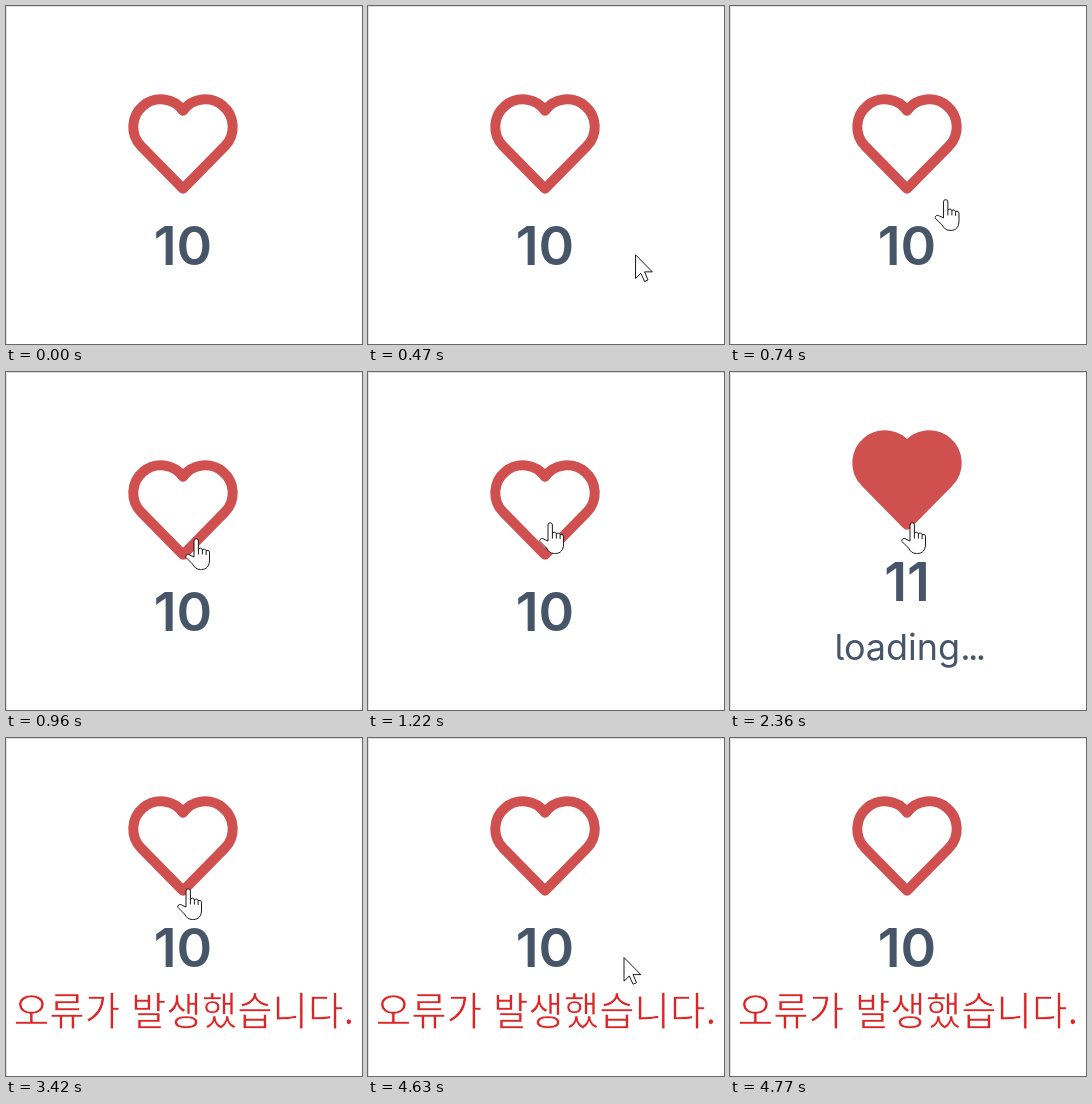
An HTML page for the animation above (6.03 s loop, 356 by 338 pixels).

```html
<!DOCTYPE html>
<html lang="ko">
<head>
<meta charset="utf-8">
<title>Like button</title>
<style>
  html, body { margin: 0; width: 100%; height: 100%; overflow: hidden; background: #fff; }
  svg { display: block; width: 100vw; height: 100vh; }
  text { fill: #475569; font-family: Inter, sans-serif; font-optical-sizing: none; }
  #count { font-size: 54px; font-weight: 600; text-anchor: middle; }
  #loading { font-size: 36px; font-feature-settings: "cv05"; }
  #loading tspan { letter-spacing: -.07em; }
  #error {
    font: 38.5px "Noto Sans CJK KR", "Noto Sans CJK", sans-serif;
    text-anchor: middle; fill: #dc2626; stroke: #fff; stroke-width: .7;
  }
  #heart { stroke: #d04f4f; stroke-width: 10; stroke-linejoin: round; }
  .cursor { fill: #fff; stroke: #000; stroke-width: .9; stroke-linejoin: round; }
  #click { fill: #ffff80; mix-blend-mode: multiply; }
</style>
</head>
<body>
<svg viewBox="0 0 356 338">
  <path d="M.5 338V.5H356" fill="none" stroke="#e0e0e0"/>
  <g id="like">
    <path id="heart" d="M177 182.8L135 140A27.5 27.5 0 1 1 177 104.7A27.5 27.5 0 1 1 219 140Z"/>
    <text id="count" x="177" y="259">10</text>
  </g>
  <text id="loading" x="104.5" y="288">loading<tspan>...</tspan></text>
  <text id="error" x="178" y="287">오류가 발생했습니다.</text>
  <g id="pointer">
    <path id="arrow" class="cursor" d="M.5.5V24.2L5.8 19 9.6 27.2 13 25.7 9.5 17.6H17.3Z"/>
    <g id="hand" class="cursor" transform="translate(-10)">
      <path d="M9 19V3a2.2 2.2 0 0 1 4.4 0V11q2.4-2 4 .5 2.6-1.5 3.7 1 3-1 3.4 1.7V22c0 6-3 9.5-8 9.5h-1c-4 0-6-2-8-5.5L1 19.5C0 17 3 15.5 5 17.2Z"/>
      <path d="M13.4 11v5.5M17.4 11.5v5M21.1 12.5v4.5" fill="none"/>
    </g>
  </g>
  <circle id="click" cx="181" cy="149.5" r="18"/>
</svg>
<script>
  const LOOP = 6030;
  const entry = [318, 302], edge = [189, 166], rest = [181, 150], exit = [330, 288];
  const el = id => document.getElementById(id);
  const show = (id, on) => el(id).setAttribute('display', on ? 'inline' : 'none');
  const move = (id, x, y) => el(id).setAttribute('transform', `translate(${x} ${y})`);

  // Eased travel between two points, sampled once per step
  function glide(t, start, end, step, from, to, power) {
    const u = Math.min(1, Math.floor((t - start) / step) * step / (end - start));
    return to.map((v, i) => v + (from[i] - v) * (1 - u) ** power);
  }

  function pointerAt(t) {
    if (t < 960) return glide(t, 330, 960, 70, entry, edge, 2);
    if (t < 4560) return glide(t, 960, 1220, 65, edge, rest, 1);
    return glide(t, 4560, 4700, 70, rest, exit, 1);
  }

  function draw() {
    const t = performance.now() % LOOP;
    const clicked = t >= 2360, failed = t >= 3420, busy = clicked && !failed;

    el('heart').setAttribute('fill', busy ? '#d04f4f' : 'none');
    el('count').textContent = busy ? 11 : 10;
    move('like', 0, clicked ? -30 : 0);
    show('loading', busy);
    show('error', failed);
    show('click', t >= 2230 && !clicked);

    const hover = t >= 680 && t < 4630;
    show('pointer', t >= 330 && t < 4770);
    show('arrow', !hover);
    show('hand', hover);
    move('pointer', ...pointerAt(t));
    requestAnimationFrame(draw);
  }
  draw();
</script>
</body>
</html>
```
